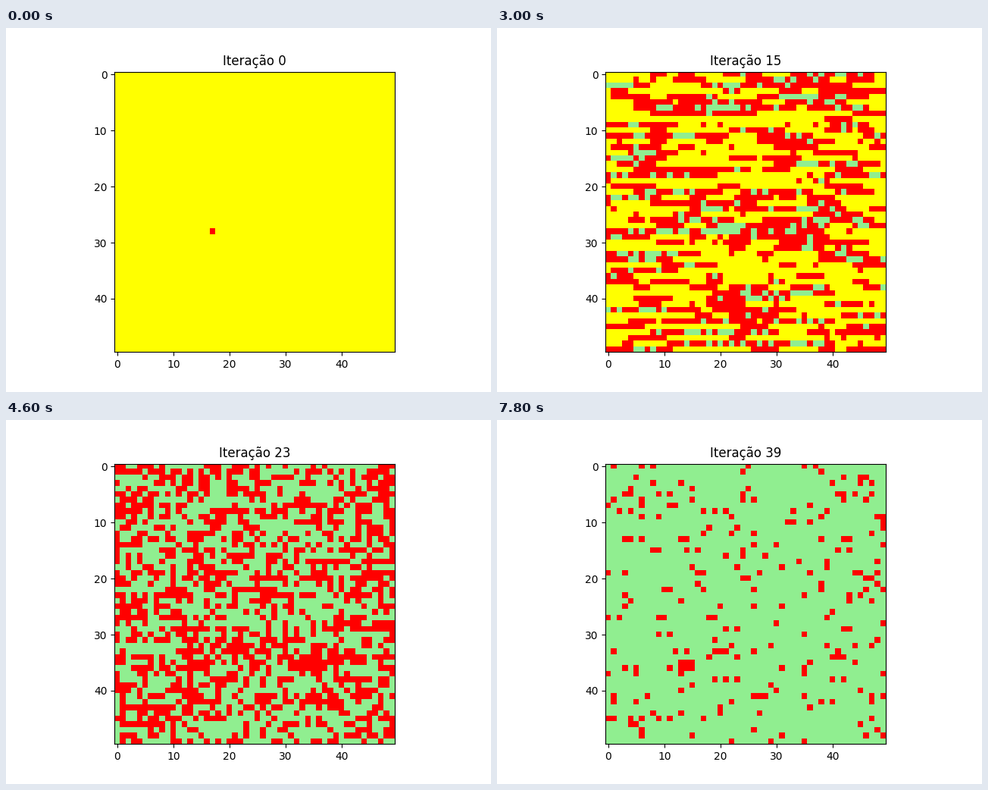
A matplotlib script for the animation above (8 s loop, 640 px wide and 480 px high).

```python
import numpy as np
import matplotlib.pyplot as plt
from matplotlib.animation import FuncAnimation
from matplotlib.colors import ListedColormap

SIZE, STEPS = 50, 40
RECOVERY = 0.1  # chance per step that a sick cell recovers
JUMP = 0.14     # distant infections per sick cell and step
NEVER = 99

# First outbreaks: row, column, step; later ones are random
OUTBREAKS = [(28, 17, 0), (6, 21, 3), (32, 5, 4), (46, 19, 4),
             (11, 11, 5), (42, 3, 5), (48, 30, 5), (16, 39, 6)]
RANDOM_FROM = 7


def spread(onset, row, col, step):
    """Infection runs one cell per step to the left and right."""
    reach = step + abs(np.arange(SIZE) - col)
    onset[row] = np.minimum(onset[row], reach)


def simulate(seed):
    """Return the steps at which each cell falls ill and recovers."""
    rng = np.random.default_rng(seed)
    onset = np.full((SIZE, SIZE), NEVER)
    stay = rng.geometric(RECOVERY, onset.shape)
    for outbreak in OUTBREAKS:
        spread(onset, *outbreak)

    for step in range(RANDOM_FROM, STEPS):
        sick = (onset < step) & (step <= onset + stay)
        jumps = round(JUMP * sick.sum())
        for row, col in rng.integers(0, SIZE, (jumps, 2)):
            spread(onset, row, col, step)
    return onset, onset + stay


onset, cured = simulate(seed=12)


def state(step):
    """0 healthy, 1 sick, 2 recovered."""
    return (onset <= step).astype(int) + (cured <= step)


fig, ax = plt.subplots(figsize=(6.4, 4.8), dpi=100)
cmap = ListedColormap(["yellow", "red", "lightgreen"])
image = ax.imshow(state(0), cmap=cmap, vmin=0, vmax=2, interpolation="nearest")
title = ax.set_title("Iteração 0")


def update(step):
    image.set_data(state(step))
    title.set_text(f"Iteração {step}")
    return image, title


anim = FuncAnimation(fig, update, frames=STEPS, interval=200,
                     repeat=True, repeat_delay=0, blit=False)
plt.show()
```
